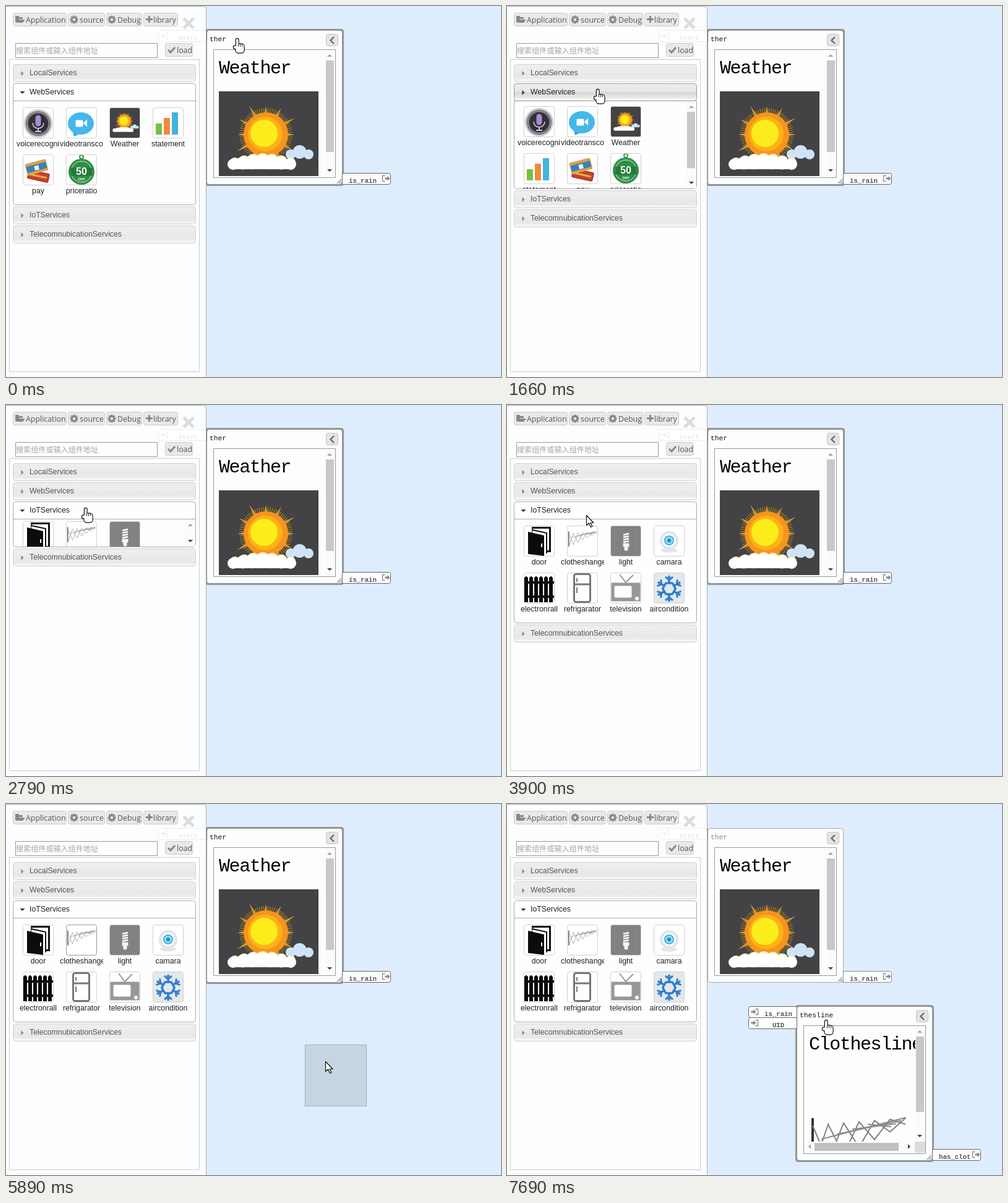
An HTML page with a canvas for the animation above (8 s loop, 800 px wide and 600 px high).

```html
<!DOCTYPE html>
<html lang="en">
<head>
<meta charset="utf-8">
<title>Service composer</title>
<style>
html, body { margin: 0; width: 100%; height: 100%; overflow: hidden; background: #deedfd; }
canvas { display: block; }
</style>
</head>
<body>
<canvas id="stage" width="800" height="600"></canvas>
<script>
const c = document.getElementById('stage').getContext('2d');
const LOOP = 8000, OPEN = 168;
const SANS = '12.3px "Liberation Sans", sans-serif';
const UI = '12.4px "Open Sans", sans-serif';
const MONO = '"Liberation Mono", monospace';

// Timing: the screen refreshes on a slow regular tick
const FIRST = 378, TICK = 140.6;
const CLOSE = 1640, OPENED = 2620, PICK = 4170, DRAG = 4590, DROP = 6140,
  LOADED = 6420, PICTURE = 6560, GRAB = 6840, SELECT = 7120;
const held = t => t < FIRST ? 0 : FIRST + Math.floor((t - FIRST) / TICK) * TICK;
const swing = p => 0.5 - Math.cos(Math.PI * Math.min(1, Math.max(0, p))) / 2;
const between = (t, a, b) => t >= a && t < b;

// Pointer moves: start, end, goal x, goal y, optional bow
const moves = [[400, 1350, 146, 134, 190, 120], [1940, 2340, 128, 166], [3770, PICK, 130, 222],
  [4570, 5480, 546, 444], [5560, 5760, 516, 416], [6700, 6980, 530, 415], [SELECT, 7680, 515, 349]];
function pointerAt(t) {
  let x = 373, y = 52;
  for (const [a, b, gx, gy, bowX = 0, bowY = 0] of moves) {
    const k = swing((t - a) / (b - a)), bow = Math.sin(Math.PI * k);
    x += (gx - x) * k + bowX * bow;
    y += (gy - y) * k + bowY * bow;
  }
  return [Math.round(x), Math.round(y)];
}

// Drawing helpers
function rect(x, y, w, h, fill) { c.fillStyle = fill; c.fillRect(x, y, w, h); }
function box(x, y, w, h, r, fill, stroke, width = 1) {
  c.beginPath();
  c.roundRect(x + 0.5, y + 0.5, w, h, r);
  if (fill) { c.fillStyle = fill; c.fill(); }
  if (stroke) { c.strokeStyle = stroke; c.lineWidth = width; c.stroke(); }
}
function trace(p) {
  c.beginPath();
  for (let i = 0; i < p.length; i += 2) c.lineTo(p[i], p[i + 1]);
}
function poly(p, fill) { trace(p); c.fillStyle = fill; c.fill(); }
function line(p, stroke, width = 1) { trace(p); c.strokeStyle = stroke; c.lineWidth = width; c.stroke(); }
function disc(x, y, r, fill, flat = 1) {
  c.beginPath(); c.ellipse(x, y, r, r * flat, 0, 0, 7); c.fillStyle = fill; c.fill();
}
function ring(x, y, r, stroke, width, end = 7) {
  c.beginPath(); c.arc(x, y, r, 0, end); c.strokeStyle = stroke; c.lineWidth = width; c.stroke();
}
function text(s, x, y, font, fill, align = 'left') {
  c.font = font; c.fillStyle = fill; c.textAlign = align; c.fillText(s, x, y);
}
function heading(s) {
  c.letterSpacing = '-1.4px';
  text(s, 20, 70, '30px ' + MONO, '#000');
  c.letterSpacing = '0px';
}
function at(x, y, draw, scale = 1, turn = 0) {
  c.save(); c.translate(x, y); c.rotate(turn); c.scale(scale, scale); draw(); c.restore();
}
function clipped(x, y, w, h, draw) {
  c.save(); c.beginPath(); c.rect(x, y, w, h); c.clip(); draw(); c.restore();
}
function spokes(x, y, n, draw) {
  for (let i = 0; i < n; i++) at(x, y, () => draw(i), 1, i * 2 * Math.PI / n);
}
function tri(x, y, dir, fill, s = 4) {
  at(x, y, () => poly([-s, s / 2, s, s / 2, 0, -s / 2], fill), 1, dir * Math.PI / 2);
}

// Pictures
function cloud(x, y, n, gap, r, fill) {
  for (let i = 0; i < n; i++) {
    const swell = Math.sin(Math.PI * i / (n - 1));
    disc(x + gap * i, y - 4 * swell, r + 3 * swell, fill);
  }
}
function weather(w, h) {
  rect(0, 0, w, h, '#434245');
  spokes(76, 70, 72, () => line([0, -30, 0, -43], '#a98322', 1.2));
  spokes(76, 70, 12, i => poly([-2.5, -33, 2.5, -33, 0, -46 - 4 * (i % 3)], '#d89c32'));
  disc(76, 70, 36, '#f7941d');
  disc(75, 69, 28, '#fbb316');
  disc(73, 68, 22, '#fdec1c');
  cloud(116, 102, 3, 14.5, 8, '#cfe2f6');
  cloud(26, 115, 7, 15, 8, '#f6efc0');
  cloud(23, 118, 7, 15.5, 9, '#fff');
  rect(24, 114, 92, 12, '#fff');
}
function airer() {
  line([6, 28, 6, 108], '#333', 4);
  const top = k => 40 - 12 * k, low = k => 112 - 74 * k;
  for (const side of [0, 1]) {
    const p = [];
    for (let i = 0; i <= 6; i++) p.push(6 + i * 25, (i % 2 === side ? top : low)(i / 6));
    line(p, '#808080', 2);
  }
  for (let i = 0; i < 4; i++) line([20 + i * 25, 62 - i * 8, 157 - i * 8, 27 + i * 5], '#8c8c8c', 2);
}
const pics = {
  mic() {
    disc(25, 26, 23, '#c9c9cc'); disc(25, 26, 20, '#66666c'); disc(25, 26, 16, '#303036');
    ring(25, 26, 18, '#95959b', 1.5);
    box(20, 12, 9, 18, 5, '#a78bd4');
    ring(25, 25, 9, '#d6c8ee', 1.5, Math.PI);
    line([25, 34, 25, 39], '#d6c8ee', 2); line([20, 39, 30, 39], '#d6c8ee', 2);
  },
  chat() {
    poly([10, 36, 13, 47, 24, 42], '#35a9dc');
    disc(24, 26, 21, '#44b8e8', 0.86);
    box(15, 20, 12, 11, 2, '#fff'); tri(31, 25.5, 3, '#fff', 6);
  },
  sun() { at(1, 1, () => weather(158, 158), 0.305); },
  chart() {
    ['#76c043', '#f08a3c', '#42b4e0'].forEach((tone, i) => rect(5 + 13 * i, 26 - 9 * i, 10, 18 + 9 * i, tone));
  },
  cards() {
    at(10, 24, () => { box(0, 0, 34, 14, 2, '#c8402c', '#8d2b20'); rect(3, 6, 28, 3, '#e9b13c'); }, 1, 0.22);
    at(3, 16, () => {
      box(0, 0, 34, 18, 2, '#3a7fbe', '#e3bc63'); rect(1, 1, 33, 4, '#e3a03c');
      rect(14, 7, 7, 7, '#f2f6fb'); rect(1, 15, 33, 3, '#e3a03c');
    }, 1, -0.26);
  },
  badge() {
    ring(25, 4, 3, '#3c9b52', 2); disc(25, 28, 21, '#2f8f46'); ring(25, 28, 17, '#d8efdc', 1);
    box(7, 21, 35, 13, 0, '#257a3a');
    text('50', 25, 33, 'bold 16px "Liberation Sans", sans-serif', '#fff', 'center');
    text('OFF', 25, 42, 'bold 6px "Liberation Sans", sans-serif', '#fff', 'center');
  },
  door() {
    box(14, 3, 28, 38, 0, '#fff', '#111', 3);
    poly([14, 5, 37, 12, 37, 46, 14, 46], '#fff');
    line([14, 7, 37, 12, 37, 45], '#111', 2);
    poly([7, 10, 33, 16, 33, 49, 7, 46], '#0c0c0c'); rect(28, 29, 2, 6, '#fff');
  },
  airer() { at(1, 1, airer, 0.3); },
  light() {
    rect(1, 1, 48, 48, '#828282');
    for (let i = 0; i < 4; i++) line([21, 15 + i * 4, 30, 13 + i * 4], '#fff', 2.8);
    box(20, 28, 10, 6, 1, '#f4f4f4'); box(22, 33, 6, 7, 2, '#f4f4f4');
  },
  camera() {
    disc(25, 40, 13, '#e4e6e8', 0.3);
    disc(25, 24, 15, '#e2e5e8'); disc(25, 24, 11, '#fafcfd'); disc(25, 24, 8, '#3cb4dc');
    ring(25, 24, 5, '#d6f0fa', 1.5); disc(25, 24, 2, '#1b7fb4');
  },
  fence() {
    for (let x = 1; x < 48; x += 8) { rect(x, 8, 6, 40, '#0c0c0c'); tri(x + 3, 7, 0, '#0c0c0c', 3); }
    rect(1, 14, 48, 4, '#0c0c0c'); rect(1, 37, 48, 4, '#0c0c0c');
  },
  fridge() {
    box(11, 2, 26, 45, 3, '#fff', '#777', 3); line([11, 19, 38, 19], '#777', 3);
    line([16, 9, 16, 15], '#777', 2); line([16, 24, 16, 33], '#777', 2);
  },
  tv() {
    line([15, 3, 25, 16, 37, 4], '#999', 2); box(1, 16, 47, 30, 1, '#979797');
    box(6, 21, 28, 19, 2, '#fff'); disc(43, 42, 3, '#fff');
  },
  snow() {
    rect(1, 1, 48, 48, '#e5e8eb');
    spokes(25, 26, 6, () => {
      line([0, -9, 0, -21], '#2f7fcf', 3.5); line([-6, -19, 0, -14, 6, -19], '#2f7fcf', 3);
      line([-5.5, -9, 5.5, -9], '#2f7fcf', 3.5);
    });
  }
};
const sections = [
  { name: 'LocalServices', items: [] },
  { name: 'WebServices', items: [['mic', 'voicerecogni'], ['chat', 'videotransco'], ['sun', 'Weather'],
    ['chart', 'statement'], ['cards', 'pay'], ['badge', 'priceratio']] },
  { name: 'IoTServices', items: [['door', 'door'], ['airer', 'clotheshanger'], ['light', 'light'], ['camera', 'camara'],
    ['fence', 'electronrall'], ['fridge', 'refrigarator'], ['tv', 'television'], ['snow', 'aircondition']] },
  { name: 'TelecomnubicationServices', items: [] }
];

// Floating windows
function port(x, y, name, out, active) {
  box(x, y, 78, 18, out ? [0, 3, 3, 0] : [3, 0, 0, 3], '#fcfdff', active ? '#666' : '#8a8a8a');
  text(name, out ? x + 11 : x + 48.5, y + 16, 'bold 10.7px ' + MONO, '#555', out ? 'left' : 'center');
  at(x + (out ? 65.5 : 4.5), y + 4.5, () => {
    line(out ? [4, 0, 0, 0, 0, 9, 4, 9] : [7, 0, 11, 0, 11, 9, 7, 9], '#888', 1.3);
    const s = out ? 4 : 0;
    rect(s, 3, 5, 3, '#888');
    tri(s + 6, 4.5, 1, '#888');
  });
}
function pane(x, y, title, active, content) {
  box(x, y, 219, 249, 4, '#fcfdff', '#aaa');
  if (active) box(x - 1, y - 1, 221, 251, 3, null, '#949494', 3);
  text(title, x + 5, y + 18, '11.3px ' + MONO, active ? '#111' : '#888');
  box(x + 193, y + 6, 19, 19, 3, '#e4e4e4', '#c4c4c4');
  line([x + 206, y + 11, x + 200.5, y + 16.5, x + 206, y + 22], '#666', 2.3);
  box(x + 11, y + 31, 197, 207, 0, '#fcfdff', '#999');
  clipped(x + 12, y + 32, 196, 206, () => at(x, y, content));
  for (let i = 0; i < 3; i++) line([x + 211 + i * 3, y + 248, x + 218, y + 241 + i * 3], '#555');
}
function scrollBar(thumb, low) {
  rect(192, 32, 16, 206, '#fafbfd');
  tri(199, 41, 0, '#a3a3a3'); tri(199, low, 2, '#444');
  rect(193, 49, 13, thumb, '#c8c8c8');
}
function weatherWindow(active) {
  pane(324, 39, 'ther', active, () => {
    heading('Weather');
    at(20, 99, () => weather(161, 137));
    scrollBar(148, 227);
  });
  port(246, 39, 'start', false, active);
  port(543, 270, 'is_rain', true, active);
}
function lineWindow(t) {
  const [px, py] = pointerAt(Math.max(t, SELECT)), x = px - 47, y = py - 22, active = t >= SELECT;
  pane(x, y, 'thesline', active, () => {
    if (t < LOADED) return;
    heading('Clothesline');
    if (t < PICTURE) return;
    at(20, 153, airer);
    scrollBar(122, 210);
    rect(12, 219, 180, 19, '#fafbfd');
    tri(21, 227, 3, '#a3a3a3'); tri(182, 227, 1, '#444');
    rect(29, 221, 136, 13, '#c1c1c1'); rect(191, 219, 17, 18, '#dcdcdc');
  });
  if (t < LOADED) return;
  port(x - 78, y, 'is_rain', false, active);
  port(x - 78, y + 18, 'UID', false, active);
  port(x + 219, y + 231, 'has_clot', true, active);
}

// Side panel
function gear(x, y) {
  spokes(x, y, 8, () => rect(-1.5, -6.5, 3, 4, '#888'));
  ring(x, y, 3.7, '#888', 2.8);
}
function button(x, y, w, label, tx) {
  box(x, y, w, 21, 3, '#e9e9e9', '#cbcbcb');
  text(label, tx, y + 16, UI, '#555');
}
function toolbar() {
  button(11, 11, 86, 'Application', 32);
  rect(15, 16, 6, 10, '#888'); rect(15, 18, 12, 3, '#888');
  poly([16, 27, 20, 22, 31, 22, 27, 27], '#888');
  button(100, 11, 59, 'source', 119); gear(110, 22);
  button(162, 11, 57, 'Debug', 180); gear(171, 22);
  button(222, 11, 55, 'library', 238);
  rect(226, 20, 11, 3, '#888'); rect(230, 16, 3, 11, '#888');
  spokes(295, 28, 4, () => line([0, 0, 8, 8], '#dcdcdc', 5));
  box(15, 60, 229, 23, 0, '#fefeff', '#999');
  text('搜索组件或输入组件地址', 16, 77, '12.1px "Noto Sans CJK SC", "Noto Sans CJK", sans-serif', '#a5a5a5');
  button(257, 60, 44, 'load', 276);
  line([262, 71, 266, 75, 273, 67], '#888', 3);
}
function header(y, name, open, hover) {
  let fill = '#fefeff';
  if (!open) {
    fill = c.createLinearGradient(0, y, 0, y + 28);
    fill.addColorStop(0, '#eee');
    fill.addColorStop(0.5, hover ? '#e6e6e6' : '#ebebeb');
    fill.addColorStop(0.51, hover ? '#d6d6d6' : '#e8e8e8');
    fill.addColorStop(0.84, '#eaeaea');
    fill.addColorStop(0.9, '#f5f5f5');
  }
  box(11, y, 295, 28, open ? [4, 4, 0, 0] : 4, fill, open ? '#aaa' : hover ? '#999' : '#d0d0d0');
  const dark = open || hover;
  tri(26.5, y + 15, open ? 2 : 1, dark ? '#333' : '#888');
  text(name, 38, y + 18, SANS, dark ? '#212121' : '#555');
}
function drawer(y, h, items, picked) {
  const moving = h < OPEN;
  box(11, y, 295, h, [0, 0, 4, 4], '#fefeff', '#aaa');
  clipped(12, y + 1, 294, h - 1, () => {
    const cols = moving ? 3 : 4, top = y + 1 + Math.round(10 * h / OPEN);
    items.forEach(([pic, label], i) => {
      const x = 27 + 70 * (i % cols), iy = top + 76 * Math.floor(i / cols);
      box(x, iy, 49, 49, 3, '#fff');
      at(x, iy, pics[pic]);
      box(x, iy, 49, 49, 3, null, picked && pic === 'airer' ? '#999' : '#d0d0d0');
      clipped(x - 10, iy + 50, 70, 20, () => {
        c.font = SANS;
        const wide = c.measureText(label).width > 68;
        text(label, wide ? x - 10 : x + 25, iy + 63, SANS, '#222', wide ? 'left' : 'center');
      });
    });
    if (!moving) return;
    rect(290, y + 1, 16, h, '#fafbfd');
    tri(298, y + 10, 0, '#a3a3a3'); tri(298, y + h - 9, 2, '#444');
    const thumb = (h - 34) * h / OPEN;
    if (thumb > 16) rect(291, y + 18, 13, thumb, '#c8c8c8');
  });
}
function panel(t) {
  box(-6, 0, 329, 620, 5, 'rgba(255,255,255,.88)', '#aaa');
  box(5, 86, 307, 505, 0, 'rgba(255,255,255,.2)', '#ccc');
  toolbar();
  const state = {
    WebServices: { h: OPEN * (1 - swing((t - 1540) / 400)), open: t < CLOSE, hover: between(t, CLOSE, 2200) },
    IoTServices: { h: OPEN * swing((t - 2629) / 400), open: t >= OPENED, hover: between(t, 2200, OPENED) }
  };
  let y = 94;
  for (const { name, items } of sections) {
    const { h = 0, open, hover } = state[name] || {}, height = Math.round(h);
    if (height > 0) drawer(y + 28, height, items, between(t, PICK, DROP));
    header(y, name, open, hover);
    y += 31 + height;
  }
}

function hand() {
  c.beginPath();
  c.roundRect(-1.5, 0.5, 3.5, 14, 1.7);
  c.roundRect(-2, 9, 13, 14, 4);
  c.roundRect(-5.5, 12, 6, 4.5, 2);
  c.strokeStyle = '#111'; c.lineWidth = 2.4; c.stroke();
  c.fillStyle = '#fff'; c.fill();
  for (const x of [2, 5, 8]) line([x, 9, x, 13], '#111');
}
function arrow() {
  poly([0, 0, 0, 16, 4, 12.5, 7, 19, 9.5, 18, 6.5, 12, 11.5, 12], '#fff');
  c.closePath(); c.lineJoin = 'round'; c.strokeStyle = '#111'; c.lineWidth = 1.2; c.stroke();
}
function render(t) {
  rect(0, 0, 800, 600, '#deedfd');
  weatherWindow(t < SELECT);
  if (t >= DROP) lineWindow(t);
  if (between(t, DRAG, DROP)) {
    const [x, y] = pointerAt(t - 95);
    box(x - 33, y - 27, 99, 99, 0, 'rgba(0,0,0,.1)', 'rgba(0,0,0,.22)');
  }
  panel(t);
  const [x, y] = pointerAt(t);
  const pointing = t < 400 || between(t, 1260, 3850) || t >= GRAB;
  at(x + 0.5, y + 0.5, pointing ? hand : arrow);
}
function tick() {
  render(held(performance.now() % LOOP));
  requestAnimationFrame(tick);
}
tick();
</script>
</body>
</html>
```
